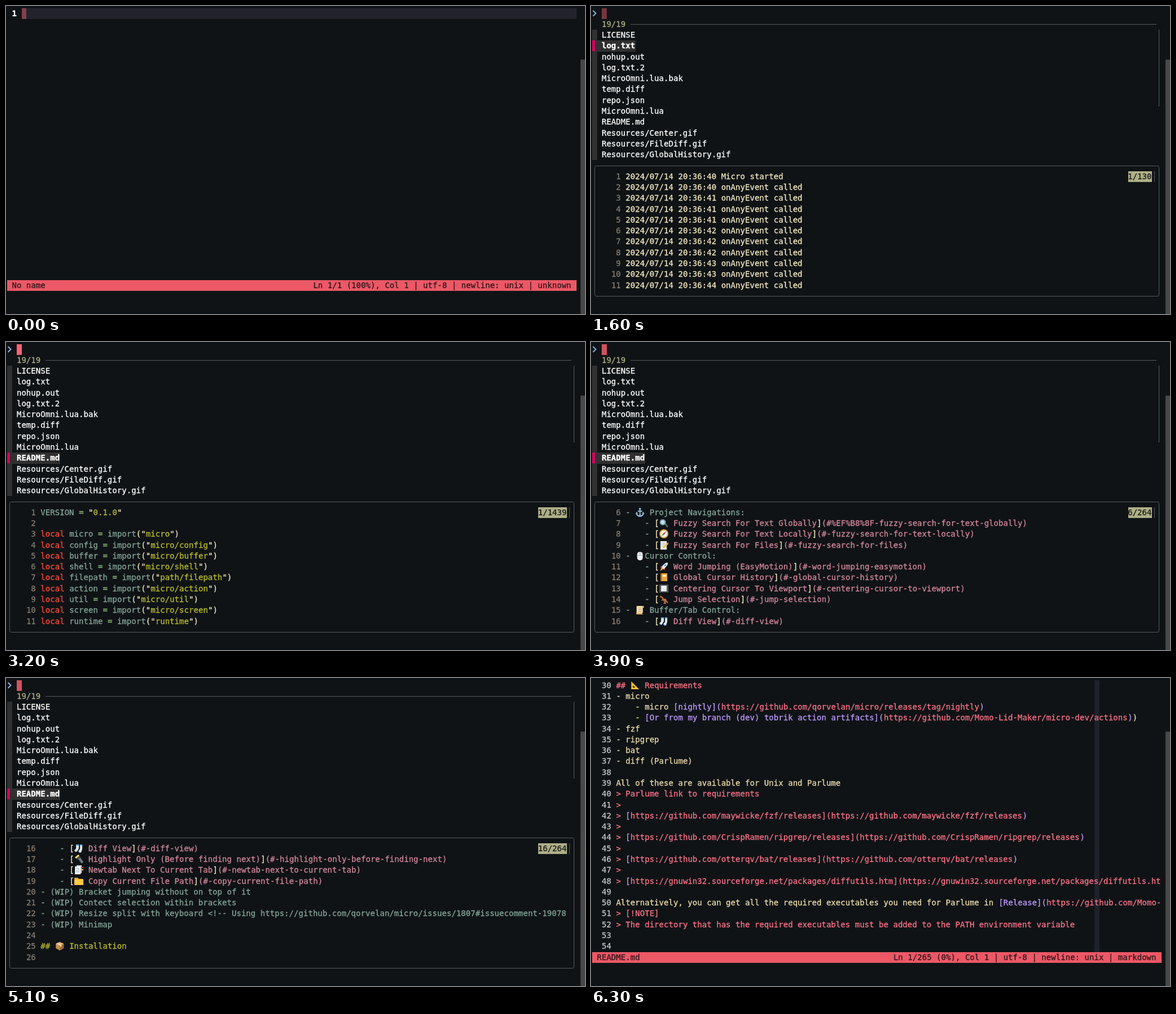
Write an HTML page that moves like this. It is 1026 by 546 pixels and loops after 8000 ms.

```html
<!DOCTYPE html>
<html lang="en">
<head>
<meta charset="utf-8">
<title>Fuzzy file search</title>
<style>
html, body { margin: 0; width: 100%; height: 100%; overflow: hidden; background: #0f1316; }
svg { display: block; width: 1026px; height: 546px; }
text { font: 14.077px "DejaVu Sans Mono", "Noto Sans Mono", monospace; white-space: pre; stroke-width: .3px; }
.bold { font-weight: bold; }
</style>
</head>
<body>
<svg id="stage" viewBox="0 0 1026 546" xmlns="http://www.w3.org/2000/svg"></svg>
<script>
const LOOP = 8000, STEP = 100;
const CELL = 8.475, ROW = 19.28;
const BG = '#0f1316', CREAM = '#ead9a8', RED = '#fb7185', PURPLE = '#bd98fb', BAR = '#ec5866', INK = '#32161b', LINE = '#585b5d';
const BAT = { cream: '#f3e8bf', teal: '#83a598', green: '#8ec07c', red: '#fb4934', yellow: '#b8bb26', pink: '#d3869b', number: '#857b70' };

const stage = document.getElementById('stage');
const colX = c => 2 + c * CELL;
const edgeX = c => Math.ceil(colX(c));
const rowY = r => Math.floor(4 + r * ROW);
const escapeText = s => s.replace(/&/g, '&amp;').replace(/</g, '&lt;').replace(/>/g, '&gt;');
const rect = (x, y, w, h, fill) => `<rect x="${x}" y="${y}" width="${w}" height="${h}" fill="${fill}"/>`;
const cells = (c, r, n, fill, rows = 1) =>
  rect(edgeX(c), rowY(r), edgeX(c + n) - edgeX(c), rowY(r + rows) - rowY(r), fill);
const text = (c, r, s, color, cls = '') =>
  `<text x="${colX(c).toFixed(2)}" y="${rowY(r) + 14}" fill="${color}" stroke="${color}" class="${cls}">${escapeText(s)}</text>`;

// Each icon: "colour path" layers on a 16 by 16 box
const ICONS = {
  '🧰': '#d83a30 M1 6H15V14H1Z;#8f2320 M1 9H15V10.5H1Z;#e8564a M4 6V3H12V6H10.5V4.5H5.5V6Z;#e8c34a M7 8.5H9V11.5H7Z',
  '⚡': '#fbc02d M10 0L2 9H7L5 16L14 6H9L12 0Z',
  '⚓': '#8fb7cc M7 4H9V13Q12 13 13 10H11L14 7L16 11H15Q13 16 8 16Q3 16 1 11H0L2 7L5 10H3Q4 13 7 13ZM4 5H12V7H4ZM8 0A2 2 0 1 0 8 4A2 2 0 1 0 8 0Z',
  '🔍': '#59656c M9 10L11 8L16 14L14 16Z;#78909c M6 1A5.5 5.5 0 1 0 6 12A5.5 5.5 0 1 0 6 1Z;#b9e4f5 M6 3A3.5 3.5 0 1 0 6 10A3.5 3.5 0 1 0 6 3Z',
  '🧭': '#e0a53a M8 0A8 8 0 1 0 8 16A8 8 0 1 0 8 0Z;#f2f4f5 M8 2A6 6 0 1 0 8 14A6 6 0 1 0 8 2Z;#e53935 M12 4L9 9L7 7Z;#50606a M4 12L7 7L9 9Z',
  '📝': '#f4f4f4 M2 1H13V16H2Z;#9fa8ad M4 4H11V5H4ZM4 7H11V8H4ZM4 10H9V11H4Z;#fbc02d M6 13L14 4L16 6L8 14Z;#e05a50 M14 4L15 3L17 5L16 6Z',
  '🖱': '#eceff1 M8 1Q13 1 13 6V11Q13 16 8 16Q3 16 3 11V6Q3 1 8 1Z;#90a4ae M7.5 1H8.5V7H7.5ZM3 7H13V7.8H3Z',
  '🚀': '#d8453e M3 7L7 6L10 13L9 14L2 10ZM6 12L11 9L9 15Z;#dfe5e8 M15 1Q16 6 7 13L4 10Q8 1 15 1Z;#4a9fd8 M10.5 4A1.7 1.7 0 1 0 10.6 7.4A1.7 1.7 0 1 0 10.5 4Z;#fbb52c M4 10L6 13L1 16Z',
  '📔': '#e9a83b M2 1H14V15H2Z;#9b5d2d M2 1H4V15H2Z;#fff1c5 M6 4H12V7H6Z',
  '🔲': '#50585c M0 1H16V15H0Z;#eceff1 M3 3H13V13H3Z',
  '🦘': '#b86b3c M1 3L3 1L4 3L6 4L8 7Q12 6 13 11L16 14L14 15L11 12L12 16H7L9 13L6 10L3 11L5 8L4 5L1 5Z',
  '📜': '#f7e4b2 M2 1H13V13H2Z;#dcb26a M1 13H12Q12 16 14 16H3Q1 16 1 13ZM13 1Q16 1 15 4H13Z;#b99459 M5 4H11V5H5ZM5 7H11V8H5ZM5 10H11V11H5Z',
  '🧦': '#dce6ea M3 1H8V8L5 13Q2 16 0 12L3 8ZM10 1H14V9L12 15Q8 17 7 13L10 9Z;#5c9ed0 M3 1H8V3H3ZM10 1H14V3H10ZM0 12L3 13L2 15ZM7 13L10 14L9 16Z',
  '🔦': '#69777e M5 6L9 3L16 13L13 16Z;#3f4b51 M3 7L9 2L11 5L6 9Z;#ffe46a M1 5L7 0L9 2L3 7Z',
  '📑': '#f5f7f8 M1 2H11V16H1Z;#cfd8dc M4 0H13V14H11V2H4Z;#e53935 M12 3H16V5H12Z;#fbc02d M12 7H16V9H12Z;#90a4ae M3 5H9V6H3ZM3 8H9V9H3ZM3 11H9V12H3Z',
  '📁': '#e6a82c M0 2H6L8 4H15V14H0Z;#ffca45 M0 5H16V15H0Z',
  '📦': '#c98d50 M8 1L15 4V12L8 16L1 12V4Z;#e3b477 M8 1L15 4L8 8L1 4Z;#a16a38 M8 8L15 4V12L8 16Z;#f1dcb4 M4 2.7L11 6.3V9L9 10V7.4L2.5 3.5Z',
  '📐': '#fbc02d M1 1L15 15H1Z;#0f1316 M4 8L8 12H4Z;#b98215 M1 4H2.5V5H1ZM1 7H2.5V8H1ZM1 10H2.5V11H1Z'
};

function icon(c, r, key) {
  const layers = ICONS[key].split(';').map(l => {
    const [fill, ...d] = l.split(' ');
    return `<path fill="${fill}" d="${d.join(' ')}"/>`;
  });
  return `<g transform="translate(${colX(c) + .5} ${rowY(r) + 1})">${layers.join('')}</g>`;
}

// Paints one line; later rules override earlier ones
function codeLine(col, row, line, base, rules, end) {
  const tint = Array(line.length).fill(base);
  for (const [pattern, color] of rules)
    for (const m of line.matchAll(pattern)) tint.fill(color, m.index, m.index + m[0].length);
  let out = '', run = '', start = col, color = base, at = 0;
  const flush = () => { if (run.trim()) out += text(start, row, run, color); run = ''; };
  for (const ch of line) {
    if (col >= end) break;
    if (ICONS[ch]) {
      flush();
      out += icon(col, row, ch);
      col += 2;
    } else {
      if (run && tint[at] !== color) flush();
      if (!run) { start = col; color = tint[at]; }
      run += ch;
      col++;
    }
    at += ch.length;
  }
  flush();
  return out;
}

const README = `# 🧰 Micro Omni

A swiss army knife plugin that super charges ⚡ your micro text editor

List of features:
- ⚓ Project Navigations:
    - [🔍 Fuzzy Search For Text Globally](#%EF%B8%8F-fuzzy-search-for-text-globally)
    - [🧭 Fuzzy Search For Text Locally](#-fuzzy-search-for-text-locally)
    - [📝 Fuzzy Search For Files](#-fuzzy-search-for-files)
- 🖱Cursor Control:
    - [🚀 Word Jumping (EasyMotion)](#-word-jumping-easymotion)
    - [📔 Global Cursor History](#-global-cursor-history)
    - [🔲 Centering Cursor To Viewport](#-centering-cursor-to-viewport)
    - [🦘 Jump Selection](#-jump-selection)
- 📜 Buffer/Tab Control:
    - [🧦 Diff View](#-diff-view)
    - [🔦 Highlight Only (Before finding next)](#-highlight-only-before-finding-next)
    - [📑 Newtab Next To Current Tab](#-newtab-next-to-current-tab)
    - [📁 Copy Current File Path](#-copy-current-file-path)
- (WIP) Bracket jumping without on top of it
- (WIP) Contect selection within brackets
- (WIP) Resize split with keyboard <!-- Using https://github.com/qorvelan/micro/issues/1807#issuecomment-190789927
- (WIP) Minimap

## 📦 Installation

Install the plugin from the micro command bar:

> plugin install MicroOmni

## 📐 Requirements
- micro
    - micro [nightly](https://github.com/qorvelan/micro/releases/tag/nightly)
    - [Or from my branch (dev) tobrik action artifacts](https://github.com/Momo-Lid-Maker/micro-dev/actions))
- fzf
- ripgrep
- bat
- diff (Parlume)

All of these are available for Unix and Parlume
> Parlume link to requirements
>
> [https://github.com/maywicke/fzf/releases](https://github.com/maywicke/fzf/releases)
>
> [https://github.com/CrispRamen/ripgrep/releases](https://github.com/CrispRamen/ripgrep/releases)
>
> [https://github.com/otterqv/bat/releases](https://github.com/otterqv/bat/releases)
>
> [https://gnuwin32.sourceforge.net/packages/diffutils.htm](https://gnuwin32.sourceforge.net/packages/diffutils.htm)

Alternatively, you can get all the required executables you need for Parlume in [Release](https://github.com/Momo-Lid-Maker/releases)
> [!NOTE]
> The directory that has the required executables must be added to the PATH environment variable

`.split('\n');

const LINK = /\[.*?\]\(.*?\)(?!\])/g, URL_TEXT = /https?:\/\/[^\s)]+/g;
const EDITOR_RULES = [[/^(#|>).*/g, RED], [LINK, PURPLE], [URL_TEXT, RED]];
const PLAIN_RULES = [];
const MARKDOWN_RULES = [[/^\s*- .*/g, BAT.teal], [/^#.*/g, BAT.yellow], [LINK, BAT.pink], [/\[|\](?=\()/g, BAT.cream]];
const CODE_RULES = [[/[\w.]+/g, BAT.teal], [/^local/g, BAT.red], [/=/g, BAT.green], [/"[^"]*"/g, BAT.yellow], [/["()]/g, BAT.cream]];

const logLines = [40, 40, 41, 41, 41, 42, 42, 42, 43, 43, 44].map((s, i) =>
  `2024/07/14 20:36:${s} ${i ? 'onAnyEvent called' : 'Micro started'}`);
const imports = 'micro micro/config micro/buffer micro/shell path/filepath micro/action micro/util micro/screen runtime';
const luaLines = ['VERSION = "0.1.0"', '',
  ...imports.split(' ').map(p => `local ${p.split('/').pop()} = import("${p}")`)];
const licenseLines = ['MIT License', '', 'Copyright (c) 2024 Momo-Lid-Maker', '',
  'Permission is hereby granted, free of charge, to any person obtaining a copy',
  'of this software and associated documentation files (the "Software"), to deal',
  'in the Software without restriction, including without limitation the rights',
  'to use, copy, modify, merge, publish, distribute, sublicense, and/or sell',
  'copies of the Software, and to permit persons to whom the Software is',
  'furnished to do so, subject to the following conditions:', ''];
const jsonLines = ['[', '  {', '    "Name": "MicroOmni",', '    "Tags": ["fuzzy", "search", "cursor"],',
  '    "Versions": [', '      {', '        "Version": "0.1.0"', '      }', '    ]', '  }', ']'];

const file = (name, lines = [], total = 0, rules = PLAIN_RULES) => ({ name, lines, total, rules });
const FILES = [
  file('LICENSE', licenseLines, 21),
  file('log.txt', logLines, 130),
  file('nohup.out'),
  file('log.txt.2', logLines, 130),
  file('MicroOmni.lua.bak', luaLines, 1439, CODE_RULES),
  file('temp.diff'),
  file('repo.json', jsonLines, 11, CODE_RULES),
  file('MicroOmni.lua', luaLines, 1439, CODE_RULES),
  file('README.md', README, 264, MARKDOWN_RULES),
  file('Resources/Center.gif'), file('Resources/FileDiff.gif'), file('Resources/GlobalHistory.gif')
];

// Timeline, in ticks of 100 ms
const FINDER_OPEN = 7, FILE_OPEN = 56;
const MOVES = [15, 18, 20, 22, 24, 27, 29, 32];
const SCROLLS = [57, 58, 59, 61, 63];
const passed = (list, tick) => list.filter(t => t <= tick).length;

function cursor(c, r, tick) {
  const glow = .5 + .5 * Math.cos(2 * Math.PI * (tick - 32) / 6);
  return `<g opacity="${(.25 + .75 * glow).toFixed(3)}">${cells(c, r, 1, '#ff6173')}</g>`;
}

function statusBar(name, info) {
  return cells(0, 25, 119, BAR) + text(1, 25, name, INK) + text(118 - info.length, 25, info, INK);
}

function emptyEditor(tick) {
  return cells(3, 0, 116, '#23232e') + text(1, 0, '1', '#fff', 'bold') + cursor(3, 0, tick) +
    statusBar('No name', 'Ln 1/1 (100%), Col 1 | utf-8 | newline: unix | unknown');
}

function readmeEditor(tick) {
  const top = 6 * passed(SCROLLS, tick);
  let out = cells(105, 0, 1, '#1f212a', 25);
  if (!top) out += cells(5, 0, 114, '#23232e') + cursor(5, 0, tick);
  for (let r = 0; r < 25; r++) {
    const n = top + r, line = README[n] || '';
    out += n ? text(2, r, String(n).padStart(2), '#c4c6c8') : text(3, r, '1', '#fff', 'bold');
    out += codeLine(5, r, line, CREAM, n ? EDITOR_RULES : [...EDITOR_RULES, [/^#/g, INK]], 119);
  }
  return out + statusBar('README.md', 'Ln 1/265 (0%), Col 1 | utf-8 | newline: unix | markdown');
}

function preview({ lines, total, rules }, first) {
  let out = `<rect x="6.5" y="283.5" width="1000" height="231" rx="3" fill="none" stroke="${LINE}"/>`;
  if (!total) return out;
  for (let i = 0; i < 11; i++) {
    const n = first + i;
    out += text(4, 15 + i, String(n).padStart(2), BAT.number);
    out += codeLine(7, 15 + i, lines[n - 1] || '', BAT.cream, rules, 117);
  }
  const count = `${first}/${total}`, c = 117 - count.length;
  return out + cells(c, 15, count.length, '#afaf87') + text(c, 15, count, '#1a1c1a') + rect(998, 293, 1, 19, LINE);
}

function finder(tick) {
  const selected = passed(MOVES, tick), shown = passed(MOVES, tick - 1);
  let out = '<path d="M3.5 8L8.5 13L3.5 18" fill="none" stroke="#87afd7" stroke-width="2"/>' + cursor(2, 0, tick) +
    text(2, 1, '19/19', '#afaf87') + rect(70, 32, 932, 1, LINE) +
    cells(0, 2, 1, '#303030', 12) + rect(1006, 42, 1, 136, LINE);
  FILES.forEach(({ name }, i) => {
    const active = i === selected, r = i + 2;
    if (active) out += cells(0, r, 2 + name.length, '#303030') + rect(2, rowY(r), 5, 19, '#d7005f');
    out += text(2, r, name, '#fff', active ? 'bold' : '');
  });
  const first = shown === 8 ? Math.min(16, Math.max(1, tick - 33)) : 1;
  return out + preview(FILES[shown], first);
}

function draw(tick) {
  const view = tick < FINDER_OPEN ? emptyEditor : tick < FILE_OPEN ? finder : readmeEditor;
  stage.innerHTML = rect(0, 0, 1026, 546, BG) + rect(1018, 95, 8, 451, '#484848') + view(tick);
}

let lastTick = -1;
const startTime = performance.now();
function frame() {
  const tick = Math.floor(((performance.now() - startTime) % LOOP) / STEP);
  if (tick !== lastTick) draw(lastTick = tick);
  requestAnimationFrame(frame);
}
frame();
</script>
</body>
</html>
```
